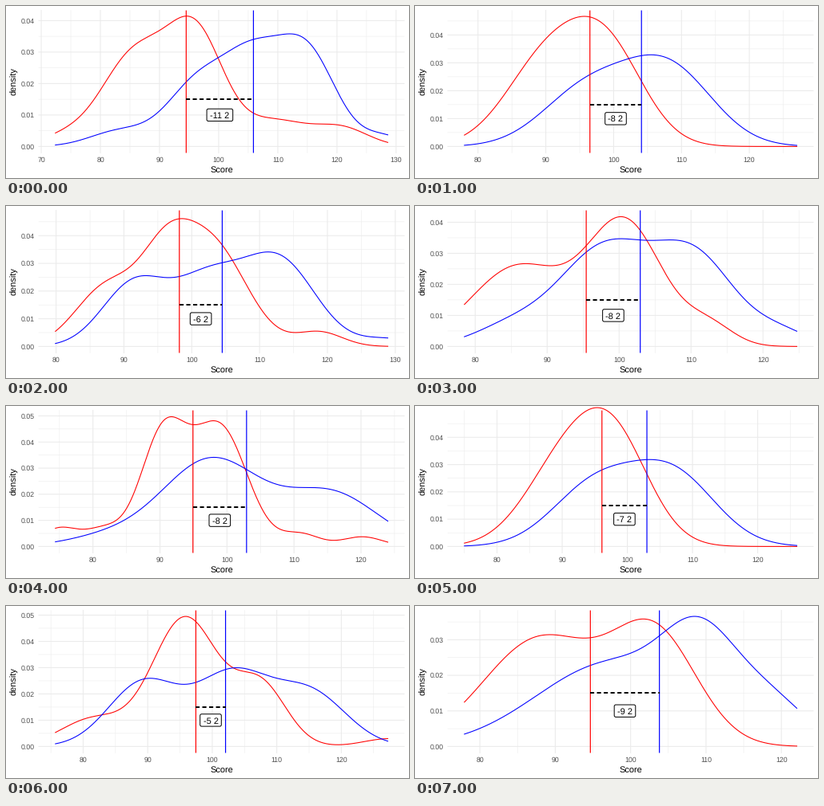
A matplotlib script that plays this animation: 504 by 216 pixels, repeating every 8000 ms.

```python
import numpy as np
import matplotlib.pyplot as plt
from matplotlib.animation import FuncAnimation
from matplotlib.patches import FancyBboxPatch

plt.rcParams["font.family"] = "Liberation Sans"
plt.rcParams["text.hinting"] = "none"

W, H = 504, 216
LEFT, RIGHT, TOP, BOTTOM = 41, 498, 5.5, 184.5   # panel
X0, X1 = 61.8, 477.5                             # ends of the curves
BASE, PEAK = 176.4, 13.6                         # zero and highest density
GRID, TICK = "#ebebeb", "#4d4d4d"

scenes = []


def add_scene(span, peak, means, red, blue):
    """Curves are sums of bell bumps (height, centre, width); heights are
    densities times 1000, everything else is in score units."""
    scenes.append((span, peak, means, red, blue))


add_scene((72.4, 128.6), 41.2, (94.51, 105.88),
          [(2.6, 73.5, 4), (29.3, 85.9, 5.7), (34, 96.2, 4.7),
           (8, 109.5, 5.5), (5.7, 120.8, 4.5)],
          [(4.8, 83.2, 5), (20.2, 96.6, 5.3), (23.3, 105.6, 4.7),
           (30.4, 114.7, 5), (3.1, 128, 3.5)])
add_scene((78, 127), 46.5, (96.5, 104.1),
          [(30, 90, 6), (33, 99, 5.5)],
          [(20, 96, 6.5), (28, 108, 6.5)])
add_scene((79.9, 128.9), 46.8, (98.17, 104.49),
          [(21.4, 87.5, 4.6), (25.5, 96, 3.8), (36, 103, 5.1), (5.2, 118.8, 3.4)],
          [(22.5, 91.5, 4.7), (22.5, 102.2, 5), (31, 112.8, 5.4), (2.7, 129, 4)])
add_scene((78.5, 124.7), 41.75, (95.43, 102.94),
          [(25.8, 86, 6.6), (39.5, 100.8, 5.2), (6.5, 112.5, 3.4)],
          [(6.3, 85, 5.2), (31.3, 98, 6.3), (28, 110.5, 5.6), (4.4, 122.5, 4)])
add_scene((74.4, 124), 49.65, (94.92, 102.92),
          [(6.9, 75, 2.7), (6.3, 81.5, 2.8), (42.5, 90.5, 3.4),
           (45.5, 98.9, 4.1), (4.7, 111, 2.8), (3.7, 120.2, 3)],
          [(3.5, 82, 6), (33.2, 97.6, 7.3), (20.2, 115.5, 7)])
add_scene((75, 126), 47.5, (96.1, 103),
          [(28, 90, 6), (36, 98, 5.5)],
          [(22, 95, 6.5), (26, 107, 6.5)])
add_scene((75.7, 127.2), 49.35, (97.46, 102.06),
          [(10.4, 81.5, 5), (49, 95.8, 5.1), (23, 107.5, 4), (3, 127.5, 4)],
          [(24.2, 89.3, 5.4), (27, 103.1, 5.7), (20, 115.2, 5.6)])
add_scene((77.95, 122.05), 36.45, (94.66, 103.82),
          [(30.4, 88.1, 7.6), (30.8, 103.2, 5.6)],
          [(23.5, 97.5, 10), (22.5, 109.3, 4.8), (11.5, 118.5, 5)])


def density(score, bumps):
    return sum(h * np.exp(-((score - c) / s) ** 2 / 2) for h, c, s in bumps)


fig = plt.figure(figsize=(W / 72, H / 72), dpi=72, facecolor="white")
ax = fig.add_axes([0, 0, 1, 1])


def line(xs, ys, color, lw, **kw):
    ax.plot(xs, ys, color=color, lw=lw, **kw)


def text(x, y, s, size, color="black", **kw):
    ax.text(x, y, s, fontsize=size, color=color, va="baseline", **kw)


def draw_axes(to_x, to_y):
    # Multiples of ten are major lines with a tick label, fives are minor.
    for v in range(65, 140, 5):
        x, major = to_x(v), v % 10 == 0
        if LEFT <= x <= RIGHT:
            line([x, x], [TOP, BOTTOM], GRID, 1.07 if major else 0.53, snap=False)
            if major:
                text(x, 196.4, str(v), 8.8, TICK, ha="center")
    for v in range(0, 60, 5):
        y, major = to_y(v), v % 10 == 0
        if y >= TOP:
            line([LEFT, RIGHT], [y, y], GRID, 1.07 if major else 0.53, snap=False)
            if major:
                text(36, y + 3.2, f"{v / 1000:.2f}", 8.8, TICK, ha="right")
    text(269.5, 209, "Score", 11, ha="center")
    text(13.3, 95, "density", 11, rotation=90, rotation_mode="anchor", ha="center")


def draw_label(x, y, s):
    w, h = 26.6 + 6 * (len(s) - 4), 15.4
    ax.add_patch(FancyBboxPatch(
        (x - w / 2, y - h / 2), w, h, boxstyle="round,pad=0,rounding_size=2",
        fc="white", ec="black", lw=1, zorder=5))
    text(x, y + 4, s, 11, ha="center", zorder=6)


def update(i):
    (lo, hi), peak, means, red, blue = scenes[i]

    def to_x(score):
        return X0 + (score - lo) / (hi - lo) * (X1 - X0)

    def to_y(dens):
        return BASE - dens / peak * (BASE - PEAK)

    ax.clear()
    ax.set_xlim(0, W)
    ax.set_ylim(H, 0)
    ax.axis("off")
    draw_axes(to_x, to_y)

    score = np.linspace(lo, hi, 512)
    xs = [to_x(m) for m in means]
    for bumps, x, color in zip((red, blue), xs, ("#ff0000", "#0000ff")):
        line(to_x(score), to_y(density(score, bumps)), color, 1.07, zorder=3)
        line([x, x], [TOP, BOTTOM], color, 1.2, snap=False,
             solid_capstyle="butt", zorder=4)

    line(xs, [to_y(15)] * 2, "black", 2, ls=(0, (2.55, 1.715)), zorder=4.5)
    gap = round(means[0] - means[1])
    draw_label(sum(xs) / 2, to_y(10), f"{gap} 2")
    return []


anim = FuncAnimation(fig, update, frames=len(scenes), interval=1000,
                     init_func=lambda: [], repeat=True)
plt.show()
```
